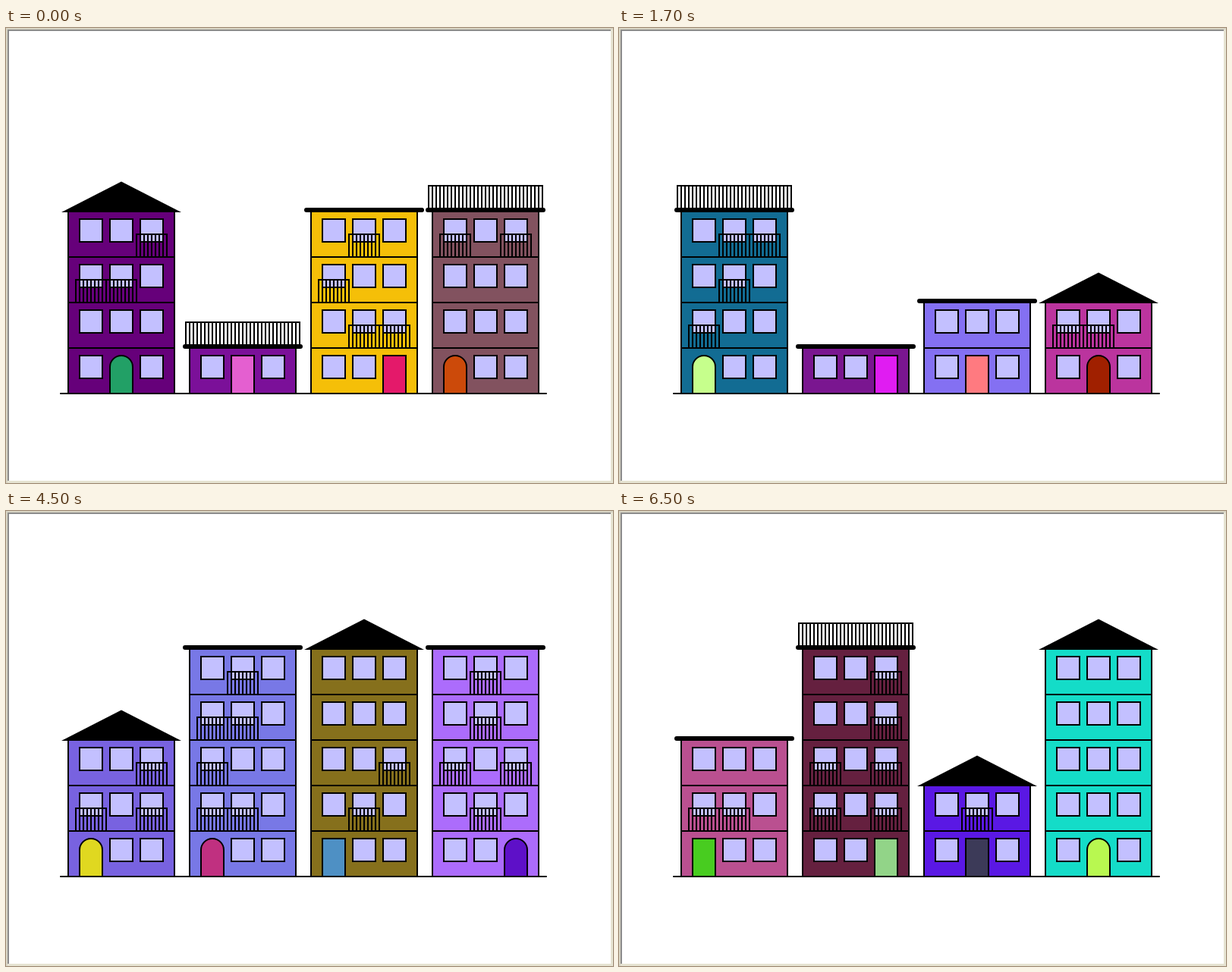
An HTML page with a canvas that plays this animation: 800x600 px, repeating every 8000 ms.

```html
<!DOCTYPE html>
<html lang="en">
<head>
<meta charset="utf-8">
<title>Street of houses</title>
<style>
  html, body { margin: 0; width: 100%; height: 100%; overflow: hidden; background: #fff; }
  canvas { display: block; }
</style>
</head>
<body>
<canvas id="stage" width="800" height="600"></canvas>
<script>
const ctx = document.getElementById('stage').getContext('2d');
const LOOP = 8000, GROUND = 482, FLOOR = 60, WIDTH = 140, GLASS = '#c3c0ff';

// House: wall, roof, door colour, door shape, door column, balconies.
// One balcony digit per upper floor, bottom up; bit n = column n.
const scenes = [
  { at: 0, houses: [
    ['#66007a', 'gable', '#22a066', 'arch', 1, '034'],
    ['#7b1099', 'rail', '#e45fd0', 'rect', 1, ''],
    ['#f5bf08', 'flat', '#e4196a', 'rect', 2, '612'],
    ['#82525f', 'rail', '#cc4a0a', 'arch', 0, '005']] },
  { at: 500, houses: [
    ['#126c93', 'rail', '#c6ff8c', 'arch', 0, '126'],
    ['#7a1690', 'flat', '#e01cf2', 'rect', 2, ''],
    ['#8470f2', 'flat', '#ff7a80', 'rect', 1, '0'],
    ['#bb349e', 'gable', '#a02000', 'arch', 1, '3']] },
  { at: 2500, houses: [
    ['#985640', 'flat', '#48cc4c', 'rect', 0, '3'],
    ['#7a7400', 'flat', '#c870bc', 'rect', 2, '1'],
    ['#8a7464', 'rail', '#d4f23a', 'arch', 0, '04'],
    ['#9ebb5c', 'flat', '#10907e', 'arch', 2, '0642']] },
  { at: 4500, houses: [
    ['#7862e0', 'gable', '#e0d820', 'arch', 0, '54'],
    ['#7878e6', 'flat', '#c03080', 'arch', 0, '3132'],
    ['#86701c', 'gable', '#4e90c4', 'rect', 0, '2400'],
    ['#ac6cfc', 'flat', '#5e10c8', 'arch', 2, '2522']] },
  { at: 6500, houses: [
    ['#ba5090', 'flat', '#48cc20', 'rect', 0, '30'],
    ['#65203f', 'rail', '#92d488', 'rect', 2, '5544'],
    ['#5a18e4', 'gable', '#3c3a58', 'rect', 1, '2'],
    ['#14dcc8', 'gable', '#b8f850', 'arch', 1, '0000']] }
];

function box(x, y, w, h, fill) {
  ctx.fillStyle = fill;
  ctx.fillRect(x, y, w, h);
  ctx.strokeRect(x, y, w, h);
}

function line(x1, y1, x2, y2, width = 2) {
  ctx.lineWidth = width;
  ctx.beginPath();
  ctx.moveTo(x1, y1);
  ctx.lineTo(x2, y2);
  ctx.stroke();
  ctx.lineWidth = 2;
}

function railing(x, y, w) {
  ctx.strokeRect(x, y, w, 30);
  ctx.beginPath();
  for (let dx = 5; dx < w; dx += 5) {
    ctx.moveTo(x + dx, y);
    ctx.lineTo(x + dx, y + 30);
  }
  ctx.stroke();
}

function drawDoor(x, y, color, shape) {
  if (shape === 'rect') return box(x, y, 30, 50, color);
  ctx.fillStyle = color;
  ctx.beginPath();
  ctx.moveTo(x, y + 50);
  ctx.lineTo(x, y + 15);
  ctx.arc(x + 15, y + 15, 15, Math.PI, 0);
  ctx.lineTo(x + 30, y + 50);
  ctx.closePath();
  ctx.fill();
  ctx.stroke();
}

function drawRoof(x, y, kind) {
  if (kind === 'gable') {
    ctx.fillStyle = '#000';
    ctx.beginPath();
    ctx.moveTo(x - 9, y + 1);
    ctx.lineTo(x + 70, y - 39.5);
    ctx.lineTo(x + 149, y + 1);
    ctx.fill();
    return;
  }
  line(x - 6, y - 2, x + 146, y - 2, 6);
  if (kind === 'rail') railing(x - 5, y - 34, 150);
}

function drawHouse(x, [wall, roof, doorColor, doorShape, doorCol, balconies]) {
  const floors = balconies.length + 1;
  for (let f = 0; f < floors; f++) {
    const y = GROUND - FLOOR * (f + 1);
    box(x, y, WIDTH, FLOOR, wall);
    for (let c = 0; c < 3; c++) {
      const wx = x + 15 + 40 * c;
      if (f === 0 && c === doorCol) drawDoor(wx, y + 10, doorColor, doorShape);
      else box(wx, y + 10, 30, 30, GLASS);
      if (f > 0 && balconies[f - 1] >> c & 1) railing(wx - 5, y + 30, 40);
    }
  }
  drawRoof(x, GROUND - FLOOR * floors, roof);
}

function drawBorder() {
  const bar = (color, ...r) => { ctx.fillStyle = color; ctx.fillRect(...r); };
  bar('#d8d4c4', 0, 0, 800, 2);
  bar('#d8d4c4', 0, 0, 2, 600);
  bar('#8c8c8c', 2, 2, 796, 2);
  bar('#8c8c8c', 2, 2, 2, 596);
  bar('#e6e3d2', 797, 2, 3, 598);
  bar('#e6e3d2', 2, 597, 798, 3);
}

function drawScene(scene) {
  ctx.fillStyle = '#fff';
  ctx.fillRect(0, 0, 800, 600);
  drawBorder();
  ctx.strokeStyle = '#000';
  ctx.lineWidth = 2;
  ctx.lineCap = 'round';
  scene.houses.forEach((house, i) => drawHouse(82 + 160 * i, house));
  line(72, GROUND, 712, GROUND);
}

const start = performance.now();
let shown = null;

function tick() {
  const t = (performance.now() - start) % LOOP;
  const scene = scenes.filter(s => s.at <= t).pop();
  if (scene !== shown) drawScene(shown = scene);
  requestAnimationFrame(tick);
}
tick();
</script>
</body>
</html>
```
